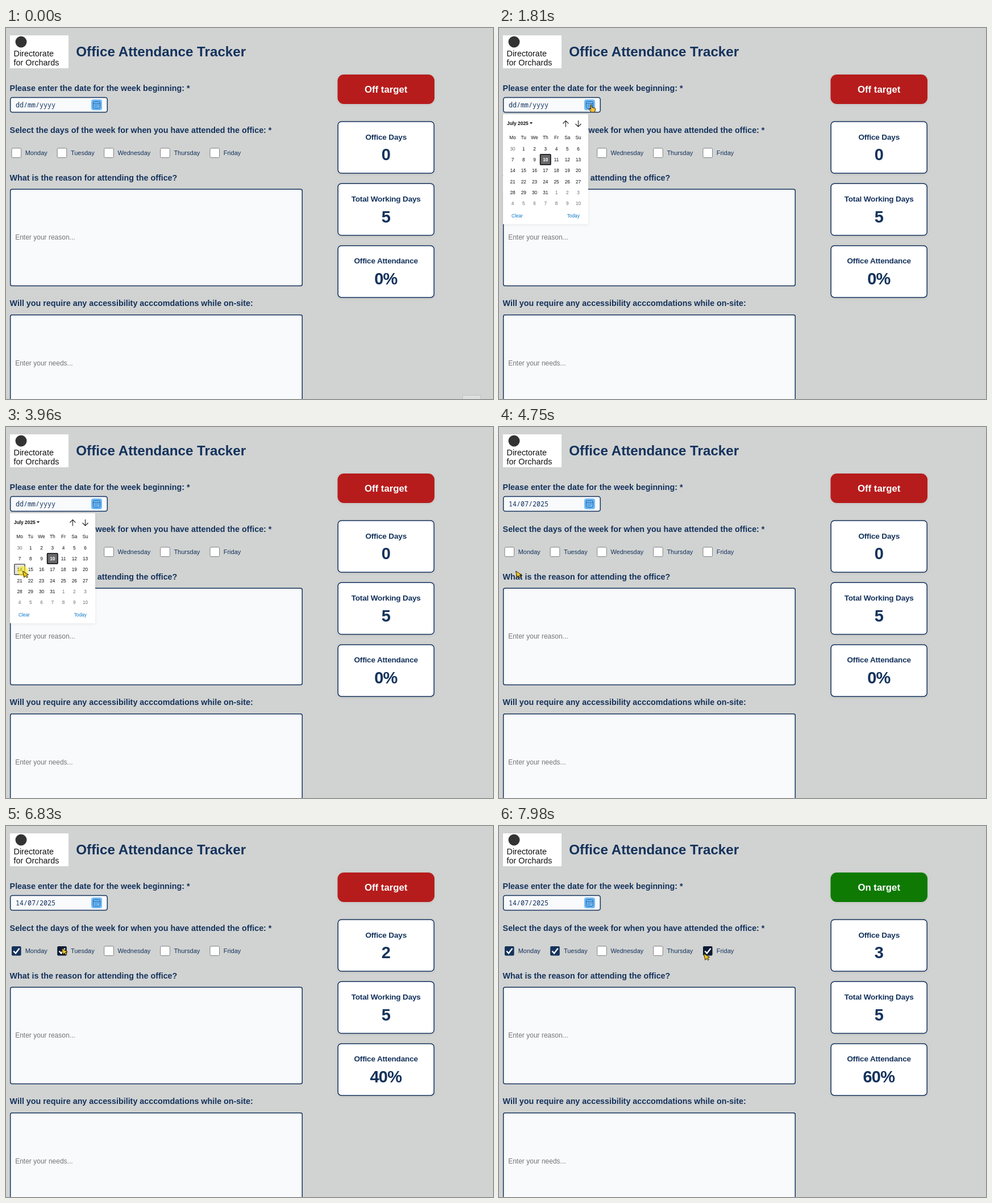
Recreate the animation shown at these times as an HTML page. Size 857 px wide and 654 px high, loop 8000 ms.

```html
<!DOCTYPE html>
<html lang="en">
<head>
<meta charset="utf-8">
<title>Office Attendance Tracker</title>
<style>
  html, body { margin: 0; width: 100%; height: 100%; overflow: hidden; background: #d1d3d2; }
  svg { display: block; width: 857px; height: 654px; font-family: "Liberation Sans", Arial, sans-serif; fill: #14325c; }
  .bold { font-weight: bold; }
  .mid { text-anchor: middle; }
  .label { letter-spacing: -.2px; }
  .value { letter-spacing: -.7px; }
  .field { fill: #f8fafc; stroke: #14325c; stroke-width: 1.5; }
  .card { fill: #fff; stroke: #14325c; stroke-width: 1.5; }
  .shadow { filter: drop-shadow(0 1.5px 2.5px rgba(0, 0, 0, .08)); }
  .line { fill: none; stroke: #222; stroke-width: 1.1; }
  #popup { fill: #111; font-size: 8.3px; }
</style>
</head>
<body>
<svg id="stage" viewBox="0 0 857 654"></svg>
<script>
const LOOP = 8000, NAVY = '#14325c';
const CELL = 19.25, GRID_X = 14.4, GRID_Y = 203;
const days = [['Monday', 18.3, 73], ['Tuesday', 98.5, 156], ['Wednesday', 181, 255],
              ['Thursday', 280, 342], ['Friday', 367.3, 413]];
const checkedAt = [5610, 6610, Infinity, Infinity, 7830];
const clicks = [[1680, 1740], [3960, 4020], [5550, 5610], [6560, 6610], [7770, 7830]];
// Pointer path: time, x, y
const path = [[70, 812, 658], [400, 60, 224], [620, 105, 124], [870, 162, 134], [940, 163, 135],
  [2010, 163, 135], [2470, 55, 231], [2820, 31, 256], [3010, 29.5, 254], [4740, 29.5, 254],
  [5290, 16.5, 217.5], [5800, 16.5, 217.5], [6360, 97, 215.5], [6810, 97, 215.5],
  [7360, 362, 217], [7860, 362, 217], [7980, 360.5, 225]];

const text = (str, x, y, size, attrs = '') => `<text x="${x}" y="${y}" font-size="${size}" ${attrs}>${str}</text>`;
const rect = (x, y, w, h, r, attrs = '') => `<rect x="${x}" y="${y}" width="${w}" height="${h}" rx="${r}" ${attrs}/>`;
const heading = (str, y) => text(str, 6.6, y, 14.3, 'class="bold"');
const card = (label, id, value, y) => rect(584.2, y + .8, 169, 91.2, 6, 'class="card shadow"')
  + text(label, 668.7, y + 32.4, 13.6, 'class="bold mid label"')
  + text(value, 668.4, y + 69.2, 29, `id="${id}" class="bold mid value"`);

function checkbox([name, x]) {
  return `<g class="check">${rect(x - 8.3, 211.9, 16.6, 16.6, 2)}
    <path d="M${x - 5} 220.5l3.6 3.9 6.6-8.6" fill="none" stroke="#fff" stroke-width="2.4"/></g>`
    + text(name, x + 15.4, 223.6, 11);
}

function calendar() {
  let out = rect(7, 152, 150, 194, 1, 'fill="#fff" class="shadow"')
    + text('July 2025', 14, 170.7, 8.4, 'class="bold"')
    + '<path d="M54 166.3h5.2l-2.6 3z"/>'
    + '<path class="line" d="M117.4 174.5v-11m-5 5l5-5 5 5M139.5 163v11m-5-5l5 5 5-5"/>'
    + rect(0, 0, 18.4, 18.4, 1, 'id="hover" fill="#e6e6e6" stroke="#444" stroke-width="1.4"')
    + rect(0, 0, 18.2, 18.2, 1, 'id="picked" fill="#696969" stroke="#12121c" stroke-width="1.7"');
  ['Mo', 'Tu', 'We', 'Th', 'Fr', 'Sa', 'Su'].forEach((d, i) => out += text(d, 24 + i * CELL, 196, 8.3, 'class="mid"'));
  for (let i = 0; i < 42; i++) {
    const outside = i < 1 || i > 31;
    out += text(new Date(2025, 5, 30 + i).getDate(), 24 + i % 7 * CELL, 215.9 + Math.floor(i / 7) * CELL, 8.3,
      `class="mid day" fill="${outside ? '#707070' : '#111'}"`);
  }
  return out + text('Clear', 22, 333.5, 8.3, 'fill="#0a78c8"') + text('Today', 119.7, 333.5, 8.3, 'fill="#0a78c8"');
}

const stage = document.getElementById('stage');
stage.innerHTML = rect(7, 13, 103, 58, 0, 'fill="#fff"')
  + '<circle cx="26.5" cy="24.5" r="10" fill="#333"/>'
  + text('Directorate', 13.5, 50.3, 14.4, 'fill="#111"') + text('for Orchards', 13.5, 65.5, 14.4, 'fill="#111"')
  + text('Office Attendance Tracker', 123.3, 50.4, 24.2, 'class="bold"')
  + heading('Please enter the date for the week beginning: *', 111.4)
  + rect(7.7, 122.5, 170.6, 26, 3.5, 'class="field"')
  + text('', 17, 139.8, 11.7, 'id="date" font-family="Noto Sans Mono, monospace"')
  + rect(150, 126, 19, 19, 4, 'fill="#6fbaf8"')
  + `<g fill="none" stroke="#235f98">${rect(153.5, 129.5, 12, 12, 2)}
     <path d="M153.5 133h12"/><path d="M156 135.8h7.5M156 138.4h5" stroke-dasharray="1.6 1.2"/></g>`
  + heading('Select the days of the week for when you have attended the office: *', 184.5)
  + days.map(checkbox).join('')
  + heading('What is the reason for attending the office?', 269.2)
  + rect(7.7, 284.2, 513.6, 170.4, 3, 'class="field"')
  + text('Enter your reason...', 16.2, 373.4, 12, 'fill="#757575"')
  + heading('Will you require any accessibility acccomdations while on-site:', 490.4)
  + rect(7.7, 505.7, 513.6, 170, 3, 'class="field"')
  + text('Enter your needs...', 16.2, 594.7, 12, 'fill="#757575"')
  + rect(583.5, 82, 170.5, 52, 11, 'id="badge" class="shadow"')
  + text('', 668.7, 113.6, 16.8, 'id="status" class="bold mid" fill="#fff"')
  + card('Office Days', 'count', 0, 164.1)
  + card('Total Working Days', 'total', 5, 273.5)
  + card('Office Attendance', 'percent', '0%', 382.9)
  + rect(803.5, 647.5, 32, 12, 0, 'id="corner" fill="#dedfdf" stroke="#bfc0c1"')
  + `<g id="popup">${calendar()}</g>`
  + `<g id="tip">${rect(171.5, 144.5, 73, 17, 2, 'fill="#fff" stroke="#b0b0b0"')}
     ${text('Show date picker', 208, 156, 8.3, 'class="mid" fill="#444"')}</g>`
  + '<circle id="glow" r="9.2" fill="#ffee10" opacity=".58"/>'
  + `<g id="pointer" stroke="#2c2410" stroke-linejoin="round">
     <path id="arrow" transform="rotate(-12)" fill="#f2c61c" stroke-width=".9" d="M0 0V11.6L2.8 9.2 4.6 13 6.6 12.1 4.9 8.4H8.6Z"/>
     <path id="hand" fill="#f6bd3a" d="M-1.6 7V.8Q-.6-.8.6.8V5L5.8 6.2Q6.9 6.8 6.6 8.4L5.4 13.4H-.4L-4.6 8.6Q-4.4 6.4-2.8 7.4L-1.6 8.6Z"/></g>`;

const el = id => document.getElementById(id);
const show = (id, on) => el(id).style.display = on ? '' : 'none';
const move = (id, x, y) => el(id).setAttribute('transform', `translate(${x} ${y})`);
const checks = [...document.querySelectorAll('.check')];
const cells = [...document.querySelectorAll('.day')];

function pointerAt(t) {
  const next = path.findIndex(p => p[0] > t);
  if (next < 0) return path[path.length - 1].slice(1);
  if (!next) return path[0].slice(1);
  const [t0, x0, y0] = path[next - 1], [t1, x1, y1] = path[next];
  const u = (t - t0) / (t1 - t0), e = u * u * (3 - 2 * u);
  return [x0 + (x1 - x0) * e, y0 + (y1 - y0) * e];
}

function drawPopup(t, x, y) {
  const open = t >= 1740 && t < 4170;
  show('popup', open);
  if (!open) return false;
  el('popup').style.opacity = Math.min(1, .4 + (t - 1740) / 116);
  const col = Math.floor((x - GRID_X) / CELL), row = Math.floor((y - GRID_Y) / CELL);
  const picked = t < 4020 ? 10 : 14;
  const inside = col >= 0 && col < 7 && row >= 0 && row < 6;
  show('hover', inside);
  move('hover', GRID_X + .4 + col * CELL, GRID_Y + .4 + row * CELL);
  move('picked', GRID_X + .5 + picked % 7 * CELL, GRID_Y + .5 + Math.floor(picked / 7) * CELL);
  cells.forEach((c, i) => {
    c.style.fill = i === picked ? '#fff' : '';
    c.style.fontWeight = i === picked ? 'bold' : '';
  });
  return true;
}

function drawChecks(t, x, y, covered) {
  checks.forEach((g, i) => {
    const on = t >= checkedAt[i];
    const hover = !covered && t >= 70 && y > 211 && y < 229 && x > days[i][1] - 9 && x < days[i][2];
    const [box, tick] = g.children;
    box.style.fill = on ? (hover ? '#0c1a33' : NAVY) : '#fff';
    box.style.stroke = on ? 'none' : hover ? '#4f4f4f' : '#808080';
    tick.style.display = on ? '' : 'none';
  });
  const count = checkedAt.filter(c => t >= c).length, good = count >= 3;
  el('count').textContent = count;
  el('percent').textContent = count * 20 + '%';
  el('status').textContent = good ? 'On target' : 'Off target';
  el('badge').setAttribute('fill', good ? '#0e7a03' : '#b71c1c');
}

function frame(now) {
  const t = now % LOOP, [x, y] = pointerAt(t);
  drawChecks(t, x, y, drawPopup(t, x, y));
  el('date').textContent = t < 4170 ? 'dd/mm/yyyy' : '14/07/2025';
  show('corner', t < 140);
  show('tip', t >= 1410 && t < 1680);
  show('glow', clicks.some(([a, b]) => t >= a && t < b));
  move('glow', x, y);
  const hand = x > 150 && x < 169 && y > 126 && y < 145;
  show('pointer', t >= 70);
  show('hand', hand);
  show('arrow', !hand);
  move('pointer', x, y);
  requestAnimationFrame(frame);
}
requestAnimationFrame(frame);
</script>
</body>
</html>
```
